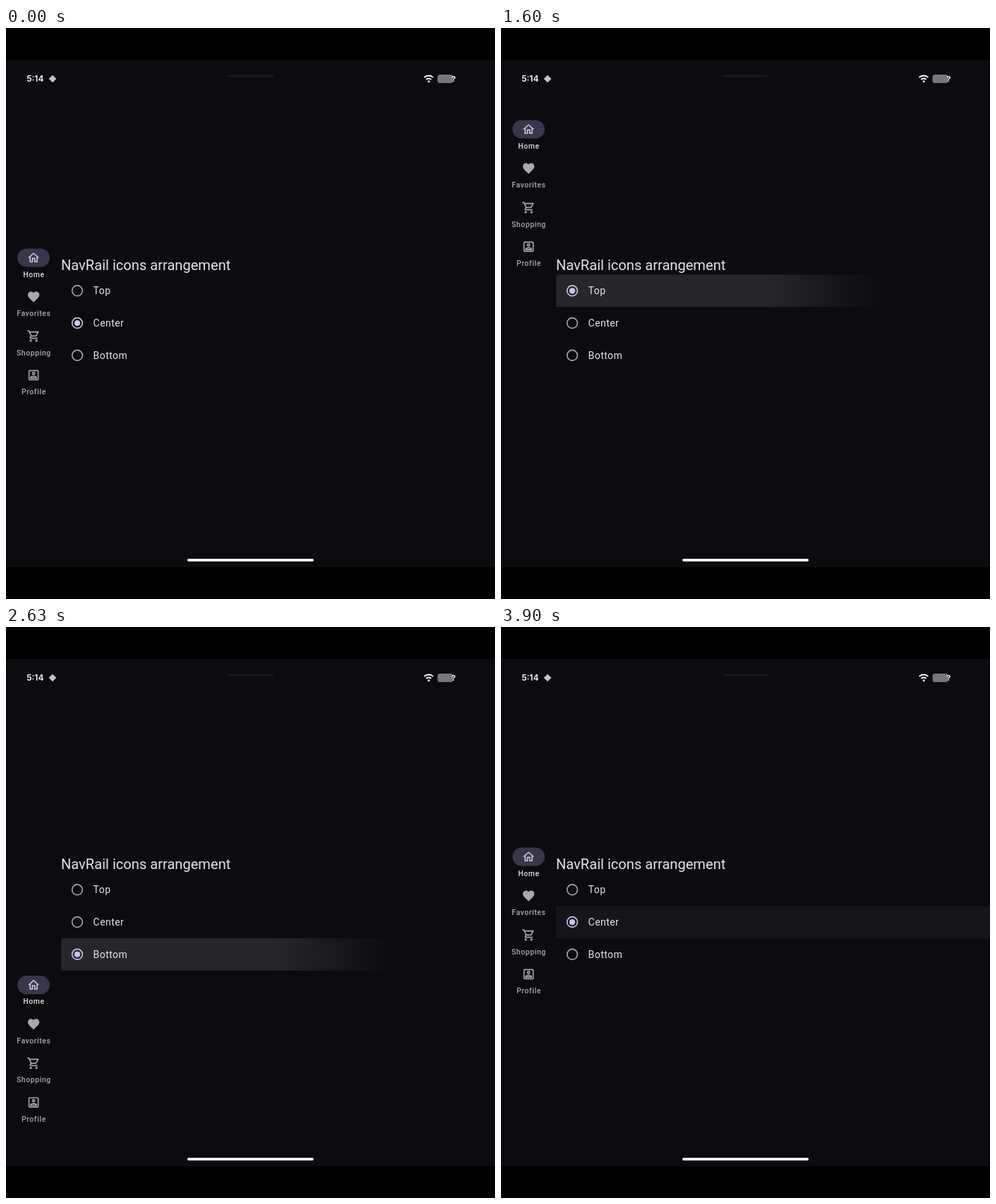
Recreate the animation shown at these times as an HTML page. Size 693x809 px, loop 4.06 s.

```html
<!DOCTYPE html>
<html lang="en">
<head>
<meta charset="utf-8">
<title>Navigation rail arrangement</title>
<style>
  html, body { margin: 0; width: 100%; height: 100%; overflow: hidden; background: #000; }
  svg { display: block; font-family: Roboto, sans-serif; }
  .status { font: 600 12px Inter, sans-serif; fill: #fff; }
  .title { font-size: 20.1px; fill: #e5e2e9; }
  .option { font-size: 14px; letter-spacing: .44px; fill: #e5e2e9; }
  .item { fill: #a9a8ae; }
  .item text { font-size: 10.5px; font-weight: 500; letter-spacing: .56px; text-anchor: middle; }
  .item.active { fill: #c9c5dc; }
  .item.active text { fill: #dedbe4; }
</style>
</head>
<body>
<svg id="stage" width="693" height="809" viewBox="0 0 693 809">
  <rect y="45" width="693" height="719" fill="#0c0b10"/>

  <text class="status" x="29.2" y="76.4">5:14</text>
  <rect x="62.2" y="68.2" width="7.6" height="7.6" fill="#c4c4c6" transform="rotate(45 66 72)"/>
  <rect x="314" y="66.8" width="65" height="2.6" rx="1.3" fill="#1b1a1f"/>
  <g fill="none" stroke="#fff" stroke-width="1.9">
    <path d="M592.6 70.2a9 9 0 0 1 12.8 0M595.4 73a5 5 0 0 1 7.2 0"/>
  </g>
  <circle cx="599.1" cy="75.8" r="1.5" fill="#fff"/>
  <rect x="611.5" y="66" width="22" height="12" rx="3.6" fill="#77767b"/>
  <text class="status" x="631.2" y="76.2" style="font-size:11px;font-weight:700">?</text>

  <g id="options"></g>
  <text class="title" x="78" y="343">NavRail icons arrangement</text>
  <g id="rail"></g>
  <rect x="257" y="752" width="179" height="3.8" rx="1.9" fill="#fff"/>
</svg>

<script>
const LOOP = 4060, LAST_CHANGE = 3900, FRAME = 100 / 3;
const TOP = 0, CENTER = 1, BOTTOM = 2;
const TAPS = [
  { at: 1482, option: TOP },
  { at: 2513, option: BOTTOM },
  { at: 3253, option: CENTER }
];
const RAIL_SHIFT = [-182, 0, 181.7];
const ROW = { x: 78.3, y: 349.4, height: 45.75 };
const RIPPLE = { x: 120, alpha: .11, fadeIn: 58, hold: 430, fadeOut: 340 };
const ON = [203, 196, 238], OFF = [168, 166, 173];

const ITEMS = [
  ['Home', 'M12 5.69l5 4.5V18h-2v-6H9v6H7v-7.81l5-4.5M12 3L2 12h3v8h6v-6h2v6h6v-8h3z'],
  ['Favorites', 'M12 21.35l-1.45-1.32C5.4 15.36 2 12.28 2 8.5 2 5.42 4.42 3 7.5 3c1.74 0 3.41.81 4.5 2.09C13.09 3.81 14.76 3 16.5 3 19.58 3 22 5.42 22 8.5c0 3.78-3.4 6.86-8.55 11.54z'],
  ['Shopping', 'M15.55 13c.75 0 1.41-.41 1.75-1.03l3.58-6.49c.37-.66-.11-1.48-.87-1.48H5.21l-.94-2H1v2h2l3.6 7.59-1.35 2.44C4.52 15.37 5.48 17 7 17h12v-2H7l1.1-2zM6.16 6h12.15l-2.76 5H8.53zM5 20a2 2 0 1 0 4 0a2 2 0 1 0-4 0M15 20a2 2 0 1 0 4 0a2 2 0 1 0-4 0'],
  ['Profile', 'M19 5v14H5V5zM19 3H5a2 2 0 0 0-2 2v14a2 2 0 0 0 2 2h14a2 2 0 0 0 2-2V5a2 2 0 0 0-2-2zM12 12a3 3 0 1 0 0-6a3 3 0 1 0 0 6zm0-4a1 1 0 1 1 0 2a1 1 0 1 1 0-2zM18 18H6v-1.53c0-2.5 3.97-3.58 6-3.58s6 1.08 6 3.58zm-9.69-2h7.38c-.69-.56-2.38-1.12-3.69-1.12s-3.01.56-3.69 1.12z']
];

const clamp = v => Math.min(1, Math.max(0, v));
const mix = (a, b, p) => a + (b - a) * p;
const set = (node, attrs) => {
  for (const key in attrs) node.setAttribute(key, attrs[key]);
  return node;
};
const add = (parent, tag, attrs, text = '') => {
  const node = set(document.createElementNS('http://www.w3.org/2000/svg', tag), attrs);
  node.textContent = text;
  return parent.appendChild(node);
};

const rail = document.getElementById('rail');
add(rail, 'rect', { x: 16.2, y: 312.4, width: 45.8, height: 26.2, rx: 13.1, fill: '#38364a' });
ITEMS.forEach(([label, path], i) => {
  const y = 325.5 + i * 55.45;
  const item = add(rail, 'g', { class: i ? 'item' : 'item active' });
  add(item, 'path', {
    d: path, 'fill-rule': 'evenodd',
    transform: `translate(39.1 ${y}) scale(.816) translate(-12 -12)`
  });
  add(item, 'text', { x: 39.4, y: y + 27.3 }, label);
});

const optionGroup = document.getElementById('options');
const options = ['Top', 'Center', 'Bottom'].map((label, i) => {
  const y = ROW.y + i * ROW.height, cy = y + ROW.height / 2;
  const gradient = add(optionGroup, 'radialGradient', {
    id: 'ripple' + i, gradientUnits: 'userSpaceOnUse', cx: RIPPLE.x, cy: cy + 5
  });
  const inner = add(gradient, 'stop', { 'stop-color': '#fff' });
  add(gradient, 'stop', { offset: 1, 'stop-color': '#fff', 'stop-opacity': 0 });
  const ripple = add(optionGroup, 'rect', {
    x: ROW.x, y, width: 693 - ROW.x, height: ROW.height, fill: `url(#ripple${i})`
  });
  const ring = add(optionGroup, 'circle', { cx: 101, cy, r: 7.35, fill: 'none', 'stroke-width': 1.65 });
  const dot = add(optionGroup, 'circle', { cx: 101, cy });
  add(optionGroup, 'text', { class: 'option', x: 123.6, y: cy + 5.1 }, label);
  return { gradient, inner, ripple, ring, dot };
});

function drawRipple({ gradient, inner, ripple }, age) {
  const opacity = age < 0 ? 0 : RIPPLE.alpha * clamp(age / RIPPLE.fadeIn)
    * (1 - clamp((age - RIPPLE.hold) / RIPPLE.fadeOut));
  set(ripple, { opacity });
  if (!opacity) return;
  const radius = 800 * (1 - Math.exp(-age / 215));
  const soft = Math.min(90, 30 + age * .45);
  set(gradient, { r: radius + soft });
  set(inner, { offset: clamp((radius - soft) / (radius + soft)) });
}

function drawRadio({ ring, dot }, level) {
  const color = `rgb(${OFF.map((c, i) => Math.round(mix(c, ON[i], level)))})`;
  set(ring, { stroke: color });
  set(dot, { fill: color, r: 4.1 * level });
}

function render(ms) {
  const t = Math.min(LAST_CHANGE, Math.floor((ms + 4) / FRAME) * FRAME);
  const levels = [0, 1, 0], ages = [-1, -1, -1];
  let selected = CENTER;
  for (const { at, option } of TAPS) {
    if (t < at) break;
    const p = clamp((t - at) / 100);
    const eased = 1 - (1 - p ** 1.5) ** 2.5;
    levels[selected] = 1 - eased;
    levels[option] = eased;
    ages[option] = t - at;
    selected = option;
  }
  set(rail, { transform: `translate(0 ${RAIL_SHIFT[selected]})` });
  options.forEach((option, i) => {
    drawRipple(option, ages[i]);
    drawRadio(option, levels[i]);
  });
}

const start = performance.now();
function tick() {
  render((performance.now() - start) % LOOP);
  requestAnimationFrame(tick);
}
tick();
</script>
</body>
</html>
```
